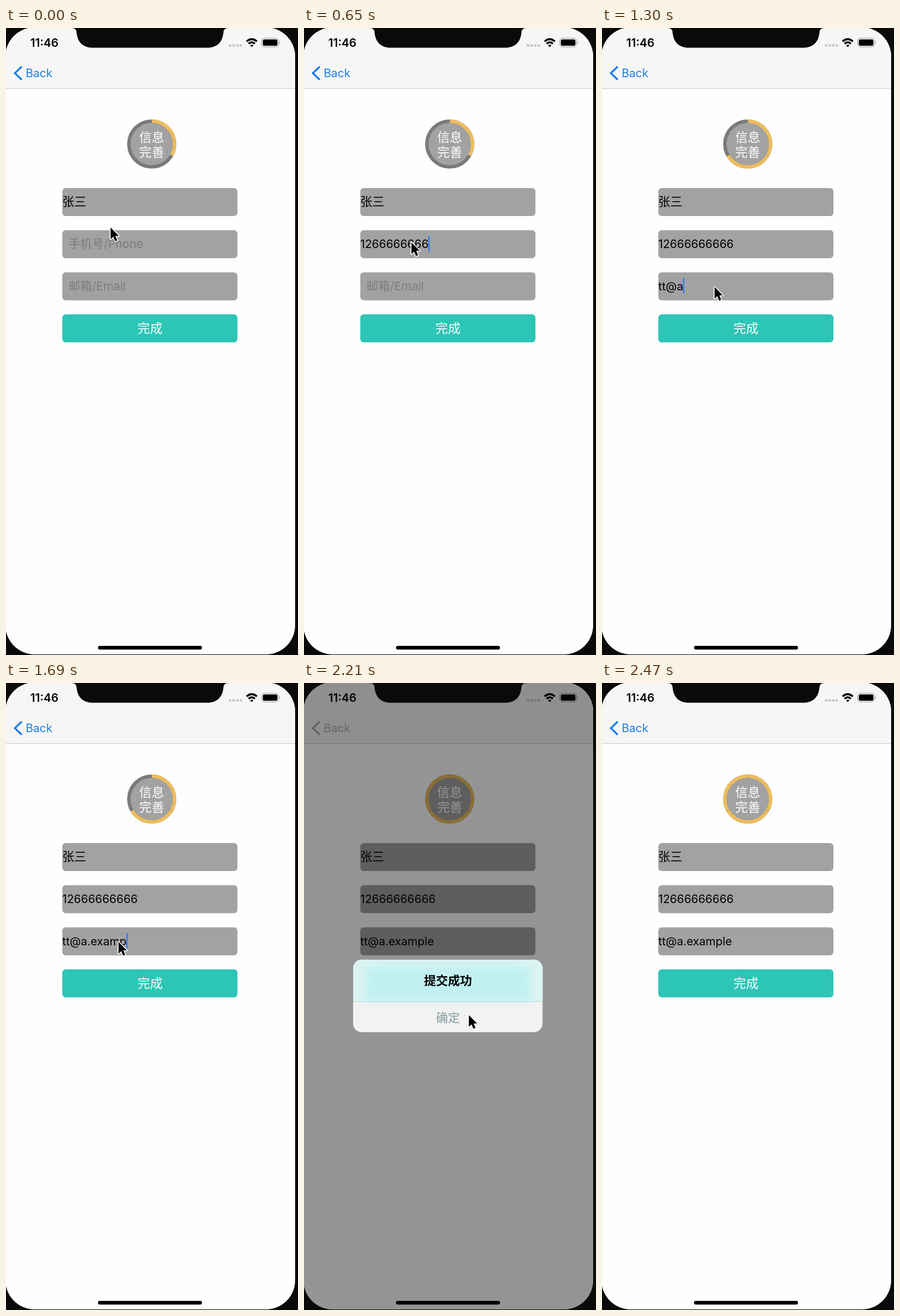
Animation of 511 by 1097 pixels, one loop 2.6 s. Source, as an HTML page:

```html
<!DOCTYPE html>
<html lang="zh-CN">
<head>
<meta charset="utf-8">
<title>信息完善</title>
<style>
  html, body { margin: 0; height: 100%; overflow: hidden; background: #0a0a0a; }
  svg { display: block; width: 100vw; height: 100vh; }
  text { font: 20.5px Inter, "Noto Sans CJK SC", "Noto Sans CJK", sans-serif; }
  .mid { text-anchor: middle; }
  .big { font-size: 22px; fill: #fff; }
  .bold { font-weight: 600; }
  .latin { font-size: 20px; }
  .hint { fill: #7c7c7c; }
</style>
</head>
<body>
<svg viewBox="0 0 511 1097">
  <defs>
    <clipPath id="screen"><rect x="-1" y="-1" width="507" height="1097" rx="51"/></clipPath>
    <clipPath id="sheet"><rect x="86" y="484" width="331.5" height="127" rx="15"/></clipPath>
    <filter id="blur" x="-20%" y="-80%" width="140%" height="260%"><feGaussianBlur stdDeviation="9"/></filter>
  </defs>

  <g clip-path="url(#screen)">
    <rect width="506" height="1097" fill="#fefefe"/>
    <rect width="506" height="106" fill="#f6f6f6"/>
    <rect y="105.5" width="506" height="1" fill="#c6c6c6"/>

    <g id="back">
      <path d="M27.5 67.5L15.5 79L27.5 90.5" fill="none" stroke="currentColor" stroke-width="3.2"/>
      <text class="latin" x="34.5" y="86" fill="currentColor">Back</text>
    </g>

    <circle cx="255" cy="203" r="40" fill="#a2a2a2" stroke="#7a7a7a" stroke-width="6"/>
    <circle id="ring" cx="255" cy="203" r="40" pathLength="360" fill="none" stroke="#edbd5d"
      stroke-width="6" transform="rotate(-89.6 255 203)"/>
    <text class="mid big" x="255" y="199">信息</text>
    <text class="mid big" x="255" y="225">完善</text>

    <g fill="#a2a2a2">
      <rect x="98.5" y="280" width="306.5" height="49" rx="6"/>
      <rect x="98.5" y="353.7" width="306.5" height="49" rx="6"/>
      <rect x="98.5" y="427.4" width="306.5" height="49" rx="6"/>
      <rect x="98.5" y="501" width="306.5" height="49" rx="6" fill="#2dc5b6"/>
    </g>
    <text x="98.5" y="311" style="font-size:21px">张三</text>
    <text id="phoneHint" class="hint" x="109.5" y="385">手机号/Phone</text>
    <text id="emailHint" class="hint" x="109.5" y="458.5">邮箱/Email</text>
    <text id="phone" class="latin" x="98.5" y="385"></text>
    <text id="email" class="latin" x="98.5" y="458.5"></text>
    <rect id="caret" width="2.4" height="27" fill="#2f7bf0"/>
    <text class="mid big" x="252" y="533">完成</text>

    <rect id="dim" width="506" height="1097"/>
  </g>

  <!-- status bar, notch and home indicator stay above the dimming -->
  <path d="M115 0Q123 0 123.5 8C125 25 135 34.5 152 34.5H352C369 34.5 379 25 380.5 8Q381 0 389 0Z" fill="#0a0a0a"/>
  <text class="latin bold" x="42.5" y="33">11:46</text>
  <path d="M390 30.5H413" stroke="#000" stroke-opacity=".2" stroke-width="4" stroke-dasharray="4.3 2"/>
  <g fill="none" stroke="#000" stroke-width="3.2">
    <path d="M421 23.5Q430 15.5 439 23.5M424.5 27.5Q430 22.5 435.5 27.5"/>
    <path d="M430 33.5L427 30.3Q430 28 433 30.3Z" fill="#000" stroke="none"/>
  </g>
  <rect x="447.5" y="18" width="29.5" height="15" rx="4.5" fill="none" stroke="#000" stroke-opacity=".4"/>
  <rect x="449.5" y="20" width="25.5" height="11" rx="2.8"/>
  <path d="M478.3 23Q480.5 25.5 478.3 28Z" fill-opacity=".4"/>
  <rect x="161" y="1081" width="182" height="6.4" rx="3.2"/>

  <g id="alert">
    <g clip-path="url(#sheet)">
      <rect x="86" y="484" width="332" height="127" fill="#f2f2f2"/>
      <rect x="86" y="484" width="332" height="73" fill="#dcf4f2"/>
      <rect x="108" y="496" width="288" height="60" fill="#c0f0f1" filter="url(#blur)"/>
      <rect id="press" x="86" y="557" width="332" height="54" fill-opacity=".06"/>
      <rect x="86" y="556.7" width="332" height="1" fill="#aedcdc"/>
    </g>
    <text class="mid bold" x="252" y="528" style="font-size:21px">提交成功</text>
    <text id="ok" class="mid" x="252" y="593" style="font-size:21px">确定</text>
  </g>

  <path id="mouse" d="M0 0V20.5L4.7 16.2L8 24L11.6 22.5L8.4 14.7H14.4Z" stroke="#fff" stroke-width="3"
    paint-order="stroke" stroke-linejoin="round"/>
</svg>

<script>
const STEP = 130, STEPS = 20;
const PHONE = '12666666666', EMAIL = 'tt@a.example';
const MOUSE_PATH = [ // step, x, y
  [0, 183, 349], [2, 188, 375], [6, 188, 375], [8, 197, 453],
  [14, 197, 453], [15, 238, 484], [16, 261, 530], [17, 288.5, 581], [19, 288.5, 581]
];
const $ = id => document.getElementById(id);
const set = (id, attrs) => {
  for (const name in attrs) $(id).setAttribute(name, attrs[name]);
};
const show = (id, on) => set(id, { visibility: on ? 'visible' : 'hidden' });

function type(id, text, count) {
  $(id).textContent = text.slice(0, Math.max(0, Math.round(count)));
  show(id + 'Hint', !$(id).textContent);
}

function mouseAt(step) {
  const i = MOUSE_PATH.findIndex(key => key[0] > step);
  if (i < 0) return MOUSE_PATH.at(-1).slice(1);
  const [s0, x0, y0] = MOUSE_PATH[i - 1], [s1, x1, y1] = MOUSE_PATH[i];
  const k = (step - s0) / (s1 - s0);
  return [x0 + (x1 - x0) * k, y0 + (y1 - y0) * k];
}

function draw(step) {
  type('phone', PHONE, (step - 2) * 3.4);
  type('email', EMAIL, (step - 8) * 2);

  const field = step >= 1 && step <= 6 ? 'phone' : step >= 8 && step <= 14 ? 'email' : '';
  show('caret', field);
  if (field) {
    set('caret', { x: 98 + $(field).getComputedTextLength(), y: $(field).getAttribute('y') - 21 });
  }

  const done = step < 7 ? 1 : step < 15 ? 2 : 3;
  set('ring', { 'stroke-dasharray': '119.2 .8 '.repeat(done) + '0 360' });

  const opening = step === 16, open = step === 17 || step === 18, pressed = step === 18;
  set('back', { color: open ? '#aeaeae' : '#1a7df0' });
  set('dim', { opacity: open ? .42 : opening ? .01 : 0 });
  set('alert', {
    opacity: open ? 1 : opening ? .05 : 0,
    transform: `translate(252 547.5) scale(${opening ? 1.2 : 1}) translate(-252 -547.5)`
  });
  show('press', pressed);
  set('ok', { fill: pressed ? '#6c97b4' : '#819c9b' });

  show('mouse', step < 19);
  set('mouse', { transform: `translate(${mouseAt(step)})` });
}

function tick() {
  draw(Math.floor(performance.now() / STEP) % STEPS);
  requestAnimationFrame(tick);
}
tick();
</script>
</body>
</html>
```
